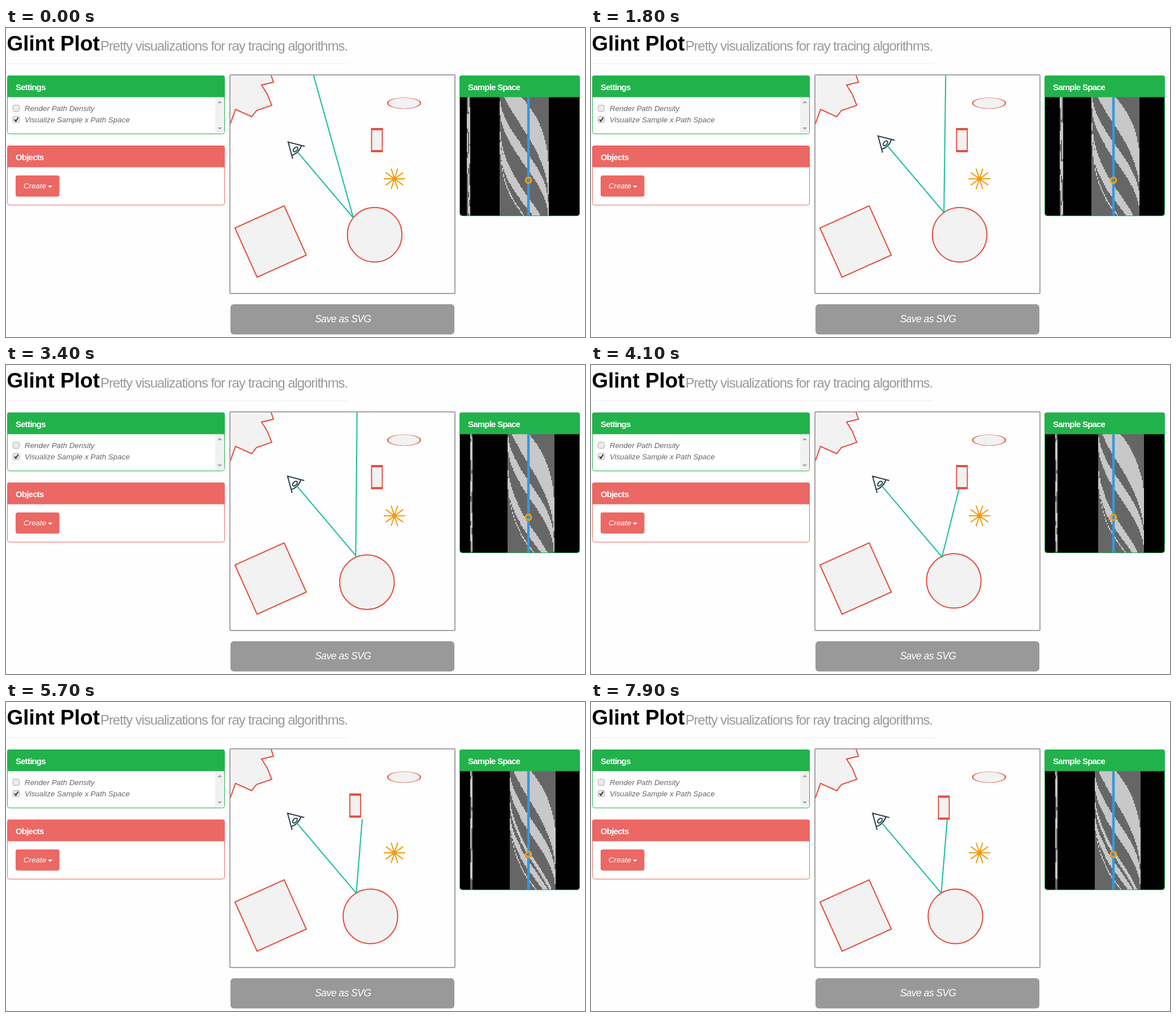
These frames come from a looping animation (1024 by 547 pixels, 8 s). An HTML page with a canvas:

```html
<!DOCTYPE html>
<html lang="en">
<head>
<meta charset="utf-8">
<title>Glint Plot</title>
<style>
  html, body { margin: 0; width: 100%; height: 100%; overflow: hidden; background: #fefefe; }
  svg, canvas { position: absolute; display: block; }
  svg { left: 0; top: 0; }
  canvas { left: 803px; top: 122px; width: 211px; height: 210px; image-rendering: pixelated; border-radius: 0 0 4px 4px; }
  text { font-family: "Liberation Sans", Arial, sans-serif; }
  .head { font-size: 15px; font-weight: 700; letter-spacing: -.8px; fill: #fff; }
  .label { font-size: 13.4px; font-style: italic; fill: #666; }
  .shape { fill: #f2f2f2; stroke: #e74c3c; stroke-width: 2; }
  .eye { fill: none; stroke: #2c3e50; stroke-width: 2; }
  .light { fill: #f39c12; stroke: #f39c12; stroke-width: 2; }
  .path { fill: none; stroke: #1abc9c; stroke-width: 2; }
</style>
</head>
<body>
<canvas id="map" width="106" height="105"></canvas>
<svg width="1024" height="547" viewBox="0 0 1024 547">
  <defs><clipPath id="view"><rect x="397" y="84" width="396" height="385"/></clipPath></defs>

  <text x="1.5" y="40" font-size="37" font-weight="700">Glint Plot</text>
  <text x="167" y="40" font-size="24" letter-spacing="-1.07" fill="#999">Pretty visualizations for ray tracing algorithms.</text>
  <path d="M2 63.5H605" stroke="#eee"/>

  <rect x="2.5" y="84.5" width="384" height="103" rx="4" fill="#fff" stroke="#22b24c"/>
  <path d="M2 122.6V88a4 4 0 0 1 4-4H383a4 4 0 0 1 4 4V122.6Z" fill="#22b24c"/>
  <text class="head" x="17" y="109.5">Settings</text>
  <rect x="370" y="123" width="16" height="63" fill="#f1f1f1"/>
  <path d="M374 133l4-4 4 4ZM374 176l4 4 4-4Z" fill="#a3a3a3"/>
  <g fill="#ebebeb" stroke="#aaa">
    <rect x="12.5" y="136.5" width="11" height="11" rx="2"/>
    <rect x="12.5" y="156.5" width="11" height="11" rx="2"/>
  </g>
  <path d="M15 162l2.5 3 4-6.5" fill="none" stroke="#333" stroke-width="2"/>
  <text class="label" x="33" y="146.5">Render Path Density</text>
  <text class="label" x="33" y="166.5">Visualize Sample x Path Space</text>

  <rect x="2.5" y="208.5" width="384" height="105" rx="4" fill="#fff" stroke="#eb6864"/>
  <path d="M2 246.6V212a4 4 0 0 1 4-4H383a4 4 0 0 1 4 4V246.6Z" fill="#eb6864"/>
  <text class="head" x="17" y="234">Objects</text>
  <rect x="17" y="261" width="77.5" height="37.5" rx="4" fill="#eb6864"/>
  <text class="label" x="31" y="284" style="fill:#fff">Create</text>
  <path d="M74 279h8l-4 4Z" fill="#fff"/>

  <rect x="396" y="83" width="398" height="387" rx="1" fill="#fefefe" stroke="#a3a3a3" stroke-width="2"/>
  <g clip-path="url(#view)">
    <polygon class="shape" id="star"/>
    <polygon class="shape" id="square"/>
    <circle class="shape" r="10" transform="translate(704 133) scale(2.9 .95)" style="stroke-width:.75"/>
    <rect class="shape" id="box" x="-10" y="-10" width="20" height="20"/>
    <circle class="shape" id="ball"/>
    <g class="light" transform="translate(687 267)"><path id="rays"/><circle r="3.5"/></g>
    <g class="eye" id="eye">
      <path d="M29.5 7.5L0 0L8 29.5M23.4 6A24 24 0 0 1 6.3 23.4"/>
      <ellipse cx="13" cy="13" rx="5" ry="3" transform="rotate(-48 13 13)"/>
    </g>
    <polyline class="path" id="path"/>
  </g>
  <rect x="397" y="489" width="396" height="53.5" rx="6" fill="#999"/>
  <text x="546.5" y="521" font-size="17.5" letter-spacing="-.55" font-style="italic" fill="#fff">Save as SVG</text>

  <path d="M802 122.6V88a4 4 0 0 1 4-4H1011a4 4 0 0 1 4 4V122.6Z" fill="#22b24c"/>
  <rect x="802.5" y="84.5" width="212" height="248" rx="4" fill="none" stroke="#22b24c"/>
  <text class="head" x="817" y="109.5">Sample Space</text>
  <path d="M924 122.6V332" stroke="#3498db" stroke-width="4.5"/>
  <circle cx="924" cy="269.5" r="4.8" fill="none" stroke="#f39c12" stroke-width="3.2"/>
</svg>
<script>
const LOOP = 8000, STEP = 100, BALL = 48.2;
const $ = id => document.getElementById(id);
const rad = deg => deg * Math.PI / 180;
const ease = k => k * k * (3 - 2 * k);

// Turning points of each drag: [ms, x, y]
const drags = {
  eye: [[1000, 499, 202], [1200, 490, 209], [1500, 513, 188], [1600, 513, 188], [2100, 498, 197]],
  ball: [[2700, 652, 366], [2900, 672, 352], [3600, 630, 392.5], [4300, 644.5, 379.5]],
  box: [[5100, 656, 198.5], [6250, 584, 170], [6500, 626, 186], [6900, 578, 174], [7300, 534, 169], [7800, 624, 187]]
};

function at(track, t) {
  const next = track.findIndex(p => p[0] >= t);
  if (next < 1) return (next ? track[track.length - 1] : track[0]).slice(1);
  const [t0, x0, y0] = track[next - 1], [t1, x1, y1] = track[next];
  const k = ease((t - t0) / (t1 - t0));
  return [x0 + (x1 - x0) * k, y0 + (y1 - y0) * k];
}

const ellipse = (x, y, rx, ry) => ({ x, y, rx, ry });
const corners = (x, y, w, h) => [[x - w, y - h], [x + w, y - h], [x + w, y + h], [x - w, y + h]];
const square = Array.from({ length: 4 }, (_, i) => {
  const a = rad(-69.2 + 90 * i);
  return [468 + 67.5 * Math.cos(a), 378 + 67.5 * Math.sin(a)];
});
const star = [[397, 169], [406, 144], [434.5, 157], [443, 146], [470, 137], [462, 117],
  [452, 101], [473, 96], [467, 78], [385, 45], [360, 150]];

function hitEllipse(e, ox, oy, dx, dy) {
  const px = (ox - e.x) / e.rx, py = (oy - e.y) / e.ry, vx = dx / e.rx, vy = dy / e.ry;
  const a = vx * vx + vy * vy, b = px * vx + py * vy, d = b * b - a * (px * px + py * py - 1);
  if (d < 0) return null;
  const t = (-b - Math.sqrt(d)) / a;
  return { t, normal: Math.atan2((py + vy * t) / e.ry, (px + vx * t) / e.rx) };
}

function hitPolygon(pts, ox, oy, dx, dy) {
  let best = null;
  pts.forEach(([ax, ay], i) => {
    const [bx, by] = pts[(i + 1) % pts.length], ex = bx - ax, ey = by - ay;
    const det = dx * ey - dy * ex, qx = ax - ox, qy = ay - oy;
    const t = (qx * ey - qy * ex) / det, s = (qx * dy - qy * dx) / det;
    if (s < 0 || s > 1 || !(t > .1) || (best && t > best.t)) return;
    const side = ey * dx - ex * dy > 0 ? -1 : 1;
    best = { t, normal: Math.atan2(-ex * side, ey * side) };
  });
  return best;
}

function cast(scene, x, y, angle) {
  const dx = Math.cos(angle), dy = Math.sin(angle);
  let best = null;
  for (const o of scene) {
    const h = (Array.isArray(o) ? hitPolygon : hitEllipse)(o, x, y, dx, dy);
    if (h && h.t > .1 && (!best || h.t < best.t)) best = h;
  }
  const t = best ? best.t : 1200;
  return { hit: !!best, x: x + dx * t, y: y + dy * t, normal: best && best.normal };
}

// u in 0..1 sweeps the hemisphere around the surface normal
const bounce = (scene, p, u) => cast(scene, p.x, p.y, p.normal + (u - .5) * Math.PI);

const canvas = $("map"), ctx = canvas.getContext("2d");
function drawMap(scene, x, y) {
  const w = canvas.width, h = canvas.height;
  ctx.fillStyle = "#000";
  ctx.fillRect(0, 0, w, h);
  for (let i = 0; i < w; i++) {
    const px = 803 + (i + .5) * 211 / w;
    const first = cast(scene, x, y, rad(45 + (px - 909.5) / 3.15));
    if (!first.hit) continue;
    for (let j = 0; j < h; j++) {
      ctx.fillStyle = bounce(scene, first, (j + .5) / h).hit ? "#c8c8c8" : "#666";
      ctx.fillRect(i, j, 1, 1);
    }
  }
}

function render(t) {
  const eye = at(drags.eye, t), ball = at(drags.ball, t), box = at(drags.box, t);
  $("eye").setAttribute("transform", `translate(${eye})`);
  $("ball").setAttribute("transform", `translate(${ball})`);
  $("box").setAttribute("transform", `translate(${box}) scale(.95 1.95)`);

  // Tracing runs one step behind the dragged shapes
  const scene = [star, square, ellipse(704, 133, 29, 9.5), ellipse(687, 267, 2.5, 2.5),
    ellipse(...at(drags.ball, t - STEP), BALL, BALL), corners(...at(drags.box, t - STEP), 10, 20.5)];
  const x = eye[0] + 14.7, y = eye[1] + 15.2;
  const first = cast(scene, x, y, Math.atan(1.182));
  const points = [[x, y], [first.x, first.y]];
  if (first.hit) {
    const second = bounce(scene, first, .7);
    points.push([second.x, second.y]);
  }
  $("path").setAttribute("points", points.join(" "));
  drawMap(scene, x, y);
}

$("ball").setAttribute("r", BALL);
$("star").setAttribute("points", star.join(" "));
$("square").setAttribute("points", square.join(" "));
$("rays").setAttribute("d", Array.from({ length: 10 }, (_, i) =>
  `M0 0L${19 * Math.cos(rad(36 * i))} ${19 * Math.sin(rad(36 * i))}`).join(""));

const start = performance.now();
let shown = -1;
function frame() {
  const t = Math.floor((performance.now() - start) % LOOP / STEP) * STEP;
  if (t !== shown) render(shown = t);
  requestAnimationFrame(frame);
}
frame();
</script>
</body>
</html>
```
